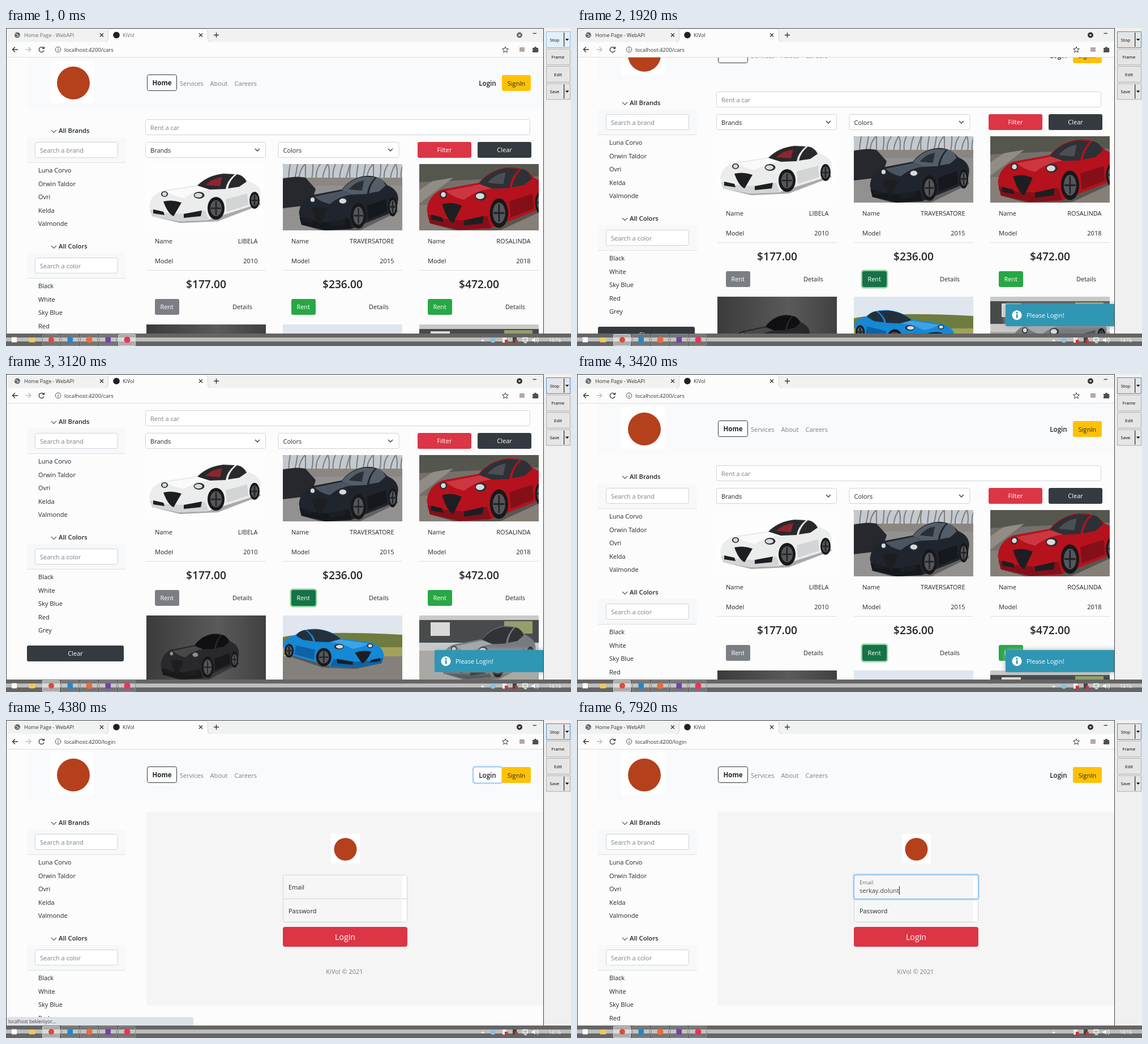
An HTML page that plays this animation: 998x561 px, repeating every 8000 ms.

```html
<!DOCTYPE html>
<html lang="en">
<head>
<meta charset="utf-8">
<title>Car rental</title>
<style>
  html, body { margin: 0; width: 998px; height: 561px; overflow: hidden; background: #fcfcfc; }
  svg { position: absolute; left: 0; top: 0; }
  text, #mail { font: 11px "Open Sans", "Noto Sans", sans-serif; fill: #212529; white-space: pre; }
  .semi { font-weight: 600; font-size: 11.2px; }
  .price { font-weight: 600; font-size: 19.2px; text-anchor: middle; }
  .mid { text-anchor: middle; }
  .end { text-anchor: end; }
  .white { fill: #fff; }
  .soft { fill: #7a8086; }
  .tab { font-size: 9px; fill: #444; }
  .url { font-size: 9.65px; fill: #333; }
  .tool { font-size: 7.8px; fill: #000; text-anchor: middle; }
  .status { font-size: 8.3px; fill: #444; }
  .line { fill: none; stroke: #333; stroke-width: 1.3; }
  #mail { position: absolute; left: 499px; top: 293px; height: 15px; line-height: 15px; color: #444; }
  #mail span { line-height: 15px; vertical-align: top; }
  #mail i { display: inline-block; width: 1px; height: 15px; background: #222; vertical-align: top; }
  .label { transform-origin: 499px 299px; }
  .toastBox { filter: drop-shadow(0 0 4px #aaa); }
</style>
</head>
<body>
<svg id="stage" width="998" height="561" viewBox="0 0 998 561"></svg>
<div id="mail"></div>
<script>
const LOOP = 8000;
let rules = '';

// Hard-cut timeline: stops are [ms, declarations].
function track(name, stops) {
  const keys = stops.map(([ms, css]) => `${ms / LOOP * 100}%{${css}}`).join('');
  rules += `@keyframes ${name}{${keys}} .${name}{animation:${name} ${LOOP}ms step-end infinite}\n`;
}
const fade = (name, ...stops) => track(name, stops.map(([ms, v]) => [ms, `opacity:${v}`]));

fade('idle', [0, 1], [1380, 0]);
fade('active', [0, 0], [1380, 1]);
fade('stopHover', [0, 1], [120, 0]);
fade('frameHover', [0, 0], [120, 1], [240, 0]);
fade('clearHover', [0, 0], [420, 1], [480, 0], [3660, 1], [3720, 0]);
fade('toast', [0, 0], [1560, .12], [1620, .33], [1680, .54], [1740, .75], [1800, .93], [1860, 1],
  [4140, .85], [4200, .62], [4260, .4], [4320, .18], [4380, 0]);
fade('toastHover', [0, 0], [2700, 1], [3120, 0]);
fade('carsPage', [0, 1], [4320, 0]);
fade('loginPage', [0, 0], [4320, 1]);
fade('loginFocus', [0, 0], [4260, 1], [5040, 0]);
fade('status', [0, 0], [4320, 1], [4620, 0]);
fade('mailFocus', [0, 0], [5040, .5], [5100, 1]);
fade('tray', [0, 1], [5040, 0]);
fade('caret', [0, 0], [5040, 1], [5580, 0], [6000, 1], [7080, 0], [7140, 1]);
track('rentFill', [[0, 'fill:#28a745'], [1020, 'fill:#218838'], [1740, 'fill:#157347']]);
track('scroll', [[0, 0], [1860, -12], [1920, -49], [1980, -97], [3360, -49], [3420, 0]]
  .map(([ms, y]) => [ms, `transform:translateY(${y}px)`]));
track('label', [[0, 'transform:none;opacity:1'],
  [5040, 'transform:translateY(-4px) scale(.93);opacity:.85'],
  [5100, 'transform:translateY(-9px) scale(.87);opacity:.65']]);

const T = (x, y, s, cls = '', more = '') => `<text x="${x}" y="${y}" class="${cls}" ${more}>${s}</text>`;
const R = (x, y, w, h, fill, r = 0, more = '') =>
  `<rect x="${x}" y="${y}" width="${w}" height="${h}" fill="${fill}" rx="${r}" ${more}/>`;
const E = (x, y, rx, ry, fill) => `<ellipse cx="${x}" cy="${y}" rx="${rx}" ry="${ry}" fill="${fill}"/>`;
const C = (x, y, r, fill, more = '') => `<circle cx="${x}" cy="${y}" r="${r}" fill="${fill}" ${more}/>`;
const P = (d, fill, more = '') => `<path d="${d}" fill="${fill}" ${more}/>`;
const L = (d, more = '') => `<path d="${d}" class="line" ${more}/>`;
const G = (cls, ...parts) => `<g class="${cls}">${parts.join('')}</g>`;
const field = (x, y, w, h, s = '', cls = 'soft') =>
  R(x + .5, y + .5, w, h, '#fff', 3, 'stroke="#ced4da"') + T(x + 9, y + 19, s, cls);
const button = (x, y, w, h, fill, s) =>
  R(x, y, w, h, fill, 3) + T(x + w / 2, y + h / 2 + 4, s, 'mid white');
const chevron = (x, y, k = 4) => L(`M${x - k} ${y - k / 2}l${k} ${k} ${k} ${-k}`);

const header = R(37, 52, 912, 90, '#f8fafb') +
  R(80, 57, 75, 75, '#fff') + C(119, 97, 29, '#b5401c') +
  R(249.5, 82.5, 52, 28, '#fdfdfd', 3, 'stroke="#343a40"') +
  T(275.5, 101, 'Home', 'mid', 'style="font-weight:700;font-size:11.5px"') +
  T(307, 102, 'Services', 'soft') + T(360.5, 102, 'About', 'soft') + T(403.5, 102, 'Careers', 'soft') +
  G('loginFocus', R(825, 82.5, 51.5, 29, '#fff', 4, 'stroke="#a9cdfb" stroke-width="2.5"')) +
  T(850.5, 101.5, 'Login', 'semi mid', 'style="font-size:11.6px"') +
  R(876, 83, 51, 28, '#ffc107', 3) + T(901.5, 101.5, 'SignIn', 'mid');

const filterList = (y, title, hint, items) =>
  L(`M80 ${y - 1}l4.5 4.5 4.5 -4.5`, 'style="stroke:#555;stroke-width:1.1"') + T(93, y + 4, title, 'semi') +
  R(37, y + 12, 175, 44, '#f7f8f9') + R(37, y + 56, 175, 1, '#dcdfe2') +
  field(51, y + 20, 146, 27, hint) +
  items.map((s, i) => T(57, y + 74 + i * 23.5, s)).join('');

const sidebar =
  filterList(181, 'All Brands', 'Search a brand', ['Luna Corvo', 'Orwin Taldor', 'Ovri', 'Kelda', 'Valmonde']) +
  filterList(385, 'All Colors', 'Search a color', ['Black', 'White', 'Sky Blue', 'Red', 'Grey']) +
  button(37, 576, 171, 28, '#343a40', 'Clear');

// Simplified three-quarter car, drawn in a 211 x 117 photo.
function car(x, y, sx, sy, { body, shade, shine, glass, cabin = glass, lamp = '#d5dadd' }) {
  const wheel = (cx, cy, rx, ry) => E(cx, cy, rx, ry, '#18181a') + E(cx, cy, rx * .68, ry * .7, '#55565a') +
    L(`M${cx - rx * .6} ${cy}h${rx * 1.2}M${cx} ${cy - ry * .6}v${ry * 1.2}`, 'style="stroke:#222326;stroke-width:2.5"');
  return `<g transform="translate(${x} ${y}) scale(${sx} ${sy})">` +
    P('M10 92L60 104 126 101 202 72 196 62Z', '#0005') +
    P('M5 74Q7 54 30 46L90 37Q108 19 136 16Q164 14 180 30Q202 37 202 52L199 68 180 76 142 88 108 99 58 101 10 92Z', body) +
    P('M36 48L92 39 112 45Q88 46 66 60Q46 56 36 48Z', shine) +
    P('M6 80L34 86 62 88 104 82 110 98 58 101 10 92Z', shade) +
    P('M140 62L178 52 180 72 142 84Z', shade) +
    P('M90 38Q108 20 136 17L156 18Q142 30 140 44L112 45Z', glass) +
    P('M104 37Q116 25 134 23L130 39Z', cabin) +
    P('M144 43Q147 28 160 18Q172 20 177 31L164 40Z', glass) +
    P('M30 66Q46 62 62 68L48 92Q38 88 30 66Z', '#1d1e21') + P('M12 80L30 84 32 90 12 87ZM66 88L98 82 96 92 66 95Z', '#1d1e21') +
    E(32, 53, 6, 5, '#2a2b2e') + E(32, 53, 4, 3.4, lamp) + E(93, 55, 9.5, 6, '#2a2b2e') + E(92, 55, 7, 4, lamp) +
    wheel(123, 78, 15, 20) + wheel(191, 64, 9, 15) + '</g>';
}

const trees = Array.from({ length: 22 }, (_, i) =>
  L(`M${i * 10} 30q${i % 3 * 4 - 4} -15 ${i % 4 * 3} -30`, 'style="stroke:#7d7d7a;stroke-width:2"')).join('');

const photos = [
  R(0, 0, 211, 117, '#fdfdfd') +
    car(0, 0, 1, 1, { body: '#ebecec', shade: '#d3d4d6', shine: '#fafafa', glass: '#29282b', cabin: '#8b2630' }),
  R(0, 0, 211, 117, '#c3c9cf') + trees + R(0, 24, 211, 16, '#8b8681') + R(0, 38, 211, 79, '#93918f') +
    P('M0 26Q24 20 40 24L58 44 50 72 0 78Z', '#26282d') +
    car(24, 3, .89, 1.13, { body: '#20252d', shade: '#15181d', shine: '#4b5562', glass: '#545e68', cabin: '#2b3037' }),
  R(0, 0, 211, 117, '#74716b') + P('M0 0H211V22L0 32Z', '#55574f') + P('M0 46L24 30 60 24 0 70Z', '#918c84') +
    R(0, 72, 211, 45, '#857f78') +
    car(8, -15, 1.08, 1.3, { body: '#b5121d', shade: '#850f18', shine: '#cc3640', glass: '#2d3136', cabin: '#4b4f53' }),
  R(0, 0, 211, 117, 'url(#dusk)') +
    car(22, 17, .7, .95, { body: '#29292b', shade: '#19191b', shine: '#48484b', glass: '#0f1011', lamp: '#8b8d90' }),
  R(0, 0, 211, 117, '#dfe6ee') + P('M0 38Q60 26 211 34V70H0Z', '#6f7c3f') + R(0, 56, 211, 18, '#a3a25a') +
    R(0, 72, 211, 45, '#84817d') +
    car(183, 11, -.9, .8, { body: '#1588d6', shade: '#0d63a5', shine: '#3da3e6', glass: '#23303c' }),
  R(0, 0, 211, 117, '#c9cac8') + R(0, 8, 211, 40, '#474b4c') + R(20, 12, 34, 24, '#d9dad7') +
    R(150, 10, 50, 22, '#93a06a') + R(0, 62, 211, 55, '#a9a8a4') +
    car(34, 1, .85, 1.1, { body: '#777b7f', shade: '#54585c', shine: '#a4a7aa', glass: '#303338' })
];
const photo = (i, x, y) => `<svg x="${x}" y="${y}" width="211" height="117">${photos[i]}</svg>`;

function card(i, model, year, price) {
  const x = 248 + 241 * i;
  const rent = R(x + 15, 478, 43, 28, i ? '#28a745' : '#7b7f84', 3, i === 1 ? 'class="rentFill"' : '');
  const ring = i === 1
    ? G('active', R(x + 13.8, 476.8, 45.4, 30.4, 'none', 4, 'stroke="#93d3a2" stroke-width="2.4"')) : '';
  return photo(i, x, 240) + photo(i + 3, x, 523) +
    T(x + 15, 379.5, 'Name') + T(x + 196.5, 379.5, model, 'end') +
    T(x + 15, 414.5, 'Model') + T(x + 196.5, 414.5, year, 'end') +
    R(x, 427, 211, 1, '#dcdfe2') + T(x + 105.5, 459, price, 'price') +
    ring + rent + T(x + 36.2, 496, 'Rent', 'mid white') + T(x + 152, 496, 'Details');
}

const carsPage = field(246, 161, 679, 27, 'Rent a car') +
  field(246, 201, 212, 27, 'Brands', ' ') + chevron(444, 215) +
  field(480.5, 201, 213, 27, 'Colors', ' ') + chevron(679, 215) +
  button(727, 201, 95, 28, '#dc3545', 'Filter') + R(833, 201, 95, 28, '#343a40', 3) +
  G('clearHover', R(833, 201, 95, 28, '#23272b', 3)) + T(880.5, 219, 'Clear', 'mid white') +
  card(0, 'LIBELA', 2010, '$177.00') + card(1, 'TRAVERSATORE', 2015, '$236.00') +
  card(2, 'ROSALINDA', 2018, '$472.00');

const loginPage = R(248, 162, 701, 342, '#f5f5f5') +
  R(574, 201, 51, 52, '#fff') + C(599.5, 228, 20, '#b5401c') +
  R(489.5, 273.5, 219, 83, '#f6f6f6', 3, 'stroke="#ced4da"') + R(700, 274, 8, 82, '#fff') +
  R(490, 315, 218, 1, '#ced4da') +
  G('mailFocus', R(488.5, 272.5, 221, 44, 'none', 3, 'stroke="#bcd9fb" stroke-width="3"'),
    R(489.5, 273.5, 219, 42, 'none', 2, 'stroke="#80b4f2"')) +
  T(499, 299, 'Email', 'label') + T(499, 340.5, 'Password') +
  R(489, 365, 220, 35, '#dc3545', 4) + T(599, 388, 'Login', 'mid white', 'style="font-size:14.2px"') +
  T(598, 447.5, 'KiVol © 2021', 'mid soft');

const toastBox = more => R(757, 487, 196, 39, '#2f96b4', 2, more);
const toast = G('toastHover', toastBox('style="filter:drop-shadow(0 0 5px #333)"')) +
  toastBox('class="toastBox"') + C(777, 506.5, 8.6, '#fff') +
  R(775.7, 505, 2.8, 6.5, '#2f96b4') + C(777, 502.3, 1.6, '#2f96b4') + T(794, 510.5, 'Please Login!', 'white');

const cross = (x, y) => L(`M${x - 3} ${y - 3}l6 6m0 -6l-6 6`);
const windowTop = ink => T(32, 15.5, 'Home Page - WebAPI', 'tab', `style="fill:${ink}"`) +
  T(206, 15.5, 'KiVol', 'tab', `style="fill:${ink}"`) +
  C(907, 12.5, 5, ink) + P('M904.5 11.5h5l-2.5 3z', '#fff');

const browser = R(0, 0, 950, 25, '#f0f1f1') + P('M175 25Q181 25 181 18V7Q181 1 187 1H350Q356 1 356 7V18Q356 25 362 25Z', '#fcfcfc') +
  R(0, 24.5, 950, 27, '#fcfcfc') + R(0, 51, 950, 1, '#dcdde0') +
  L('M175 24.5Q180.5 24.5 180.5 18V7Q180.5 1 187 1H350Q356.5 1 356.5 7V18Q356.5 24.5 362 24.5', 'style="stroke:#d4d6d8;stroke-width:1"') +
  C(20, 12.5, 5, '#5f6368') + L('M16 11h4l1 3h3M19 16l1 -2', 'style="stroke:#f0f1f1;stroke-width:1"') +
  C(195, 12.5, 5.8, '#202124') + cross(169, 12.5) + cross(344, 12.5) + L('M367 12.5h9M371.5 8v9') +
  G('idle', windowTop('#6a6d70')) + G('active', windowTop('#333')) + L('M930.5 9.5h6.5') +
  L('M21 38h-9.5m4.5 -4.5l-4.5 4.5 4.5 4.5') +
  L('M34.5 38h9.5m-4.5 -4.5l4.5 4.5 -4.5 4.5', 'style="stroke:#b9bbbd"') +
  L('M66.5 35.5a4.5 4.5 0 1 0 .6 4M67.5 33v3.2h-3.4') +
  C(92, 38, 4.8, 'none', 'stroke="#555"') + R(91.5, 37.2, 1.1, 3.6, '#555') + R(91.5, 35.2, 1.1, 1.1, '#555') +
  G('carsPage', T(103, 41.5, 'localhost:4200/cars', 'url')) +
  G('loginPage', T(103, 41.5, 'localhost:4200/login', 'url')) +
  L('M882 33l1.5 3.5 3.8 .3 -2.9 2.5 .9 3.7 -3.3 -2 -3.3 2 .9 -3.7 -2.9 -2.5 3.8 -.3z', 'style="stroke-width:1"') +
  R(907, 34, 9, 8, '#b9a5a4', 1) + P('M930 35h3a2 2 0 0 1 4 0h3v3a2 2 0 0 1 0 3v2h-10v-3a2 2 0 0 0 0 -3z', '#4b4e52') +
  G('status', R(1, 524, 330, 15, '#dee1e6', 2), T(4, 535, 'localhost bekleniyor...', 'status')) +
  L('M.5 539V.5H949.5V539', 'style="stroke:#444;stroke-width:1"');

const slot = (x, on) => R(x + .5, 540.5, 30, 20, on ? '#ffffff66' : '#ffffff1c', 1, `stroke="${on ? '#d8d8d8' : '#8c8c8c'}"`);
const taskbar = R(0, 539, 998, 22, '#656565') + R(0, 546, 998, 7, '#bdbdbd') +
  [64, 97.5, 131, 164.5, 198].map(x => slot(x)).join('') +
  G('idle', slot(198, true)) + G('active', slot(64, true)) +
  R(10, 545.5, 9, 9, '#fff') + R(40.5, 546, 11, 8.5, '#f0c95a', 1) + C(80, 550, 5, '#e04a36') +
  R(108.5, 545.5, 9.5, 9.5, '#1f87d0') + C(147, 550, 5.5, '#f26a35') + R(175.5, 545.5, 9.5, 9.5, '#7740a8') +
  C(214, 550, 5.5, '#ee3159') +
  P('M839 552.5l3 -3.5 3 3.5z', '#fff') + G('tray', C(860, 550.5, 4.8, '#8cc0dd')) +
  P('M877 546h7v9h-7z', '#eee') + R(881, 550, 5.5, 5.5, '#d33528') +
  R(895, 546, 7, 9, '#444') + R(899, 550, 5, 5.5, '#c43a32') +
  L('M913 546.5h8v6h-8zM915 555h5', 'style="stroke:#fff"') +
  P('M929 549h2.5l3 -3v9l-3 -3H929z', '#fff') + L('M936.5 547.5q2.5 3 0 6m2 -8q4 5 0 10', 'style="stroke:#fff;stroke-width:1"') +
  T(969.5, 553.5, '14:16', 'tool', 'style="fill:#fff;font-size:8.4px"');

const tool = (y, s, split, edge = '#adadad', fill = '#e5e5e5') =>
  R(954.5, y + .5, 42, 28, fill, 0, `stroke="${edge}"`) + T(split ? 969 : 975, y + 17.5, s, 'tool') +
  (split ? R(985, y + 2, 1.3, 25, '#333') + P(`M988 ${y + 13}h6.4l-3.2 3.5z`, '#000') : '');
const panel = R(950, 0, 48, 539, '#f0f0f0') +
  tool(6, 'Stop', true, '#3c8fd8') + G('stopHover', tool(6, 'Stop', true, '#7db8ea', '#e3f0fb')) +
  tool(36.5, 'Frame') + G('frameHover', tool(36.5, 'Frame', false, '#3c8fd8', '#e3f0fb')) +
  tool(67, 'Edit') + tool(97.5, 'Save', true);

// Typed address: each letter has no size until its moment.
const mail = 'serkay.dolunt';
const typedAt = [6000, 6060, 6240, 6360, 6480, 6600, 7140, 7200, 7260, 7440, 7560, 7740, 7920];
typedAt.forEach((ms, i) => track('key' + i, [[0, 'font-size:0'], [ms, 'font-size:11px']]));

const sheet = document.createElement('style');
sheet.textContent = rules;
document.head.append(sheet);

document.getElementById('stage').innerHTML =
  `<defs><clipPath id="view"><rect x="1" y="52" width="948" height="487"/></clipPath>
  <linearGradient id="dusk"><stop stop-color="#3b3b3c"/><stop offset=".6" stop-color="#5a5a5b"/><stop offset="1" stop-color="#414142"/></linearGradient></defs>` +
  R(0, 0, 998, 561, '#fcfcfc') +
  `<g clip-path="url(#view)">${G('scroll', header, sidebar, G('carsPage', carsPage), G('loginPage', loginPage))}${G('toast', toast)}</g>` +
  browser + panel + taskbar;
document.getElementById('mail').innerHTML =
  [...mail].map((ch, i) => `<span class="key${i}">${ch}</span>`).join('') + '<i class="caret"></i>';
</script>
</body>
</html>
```
